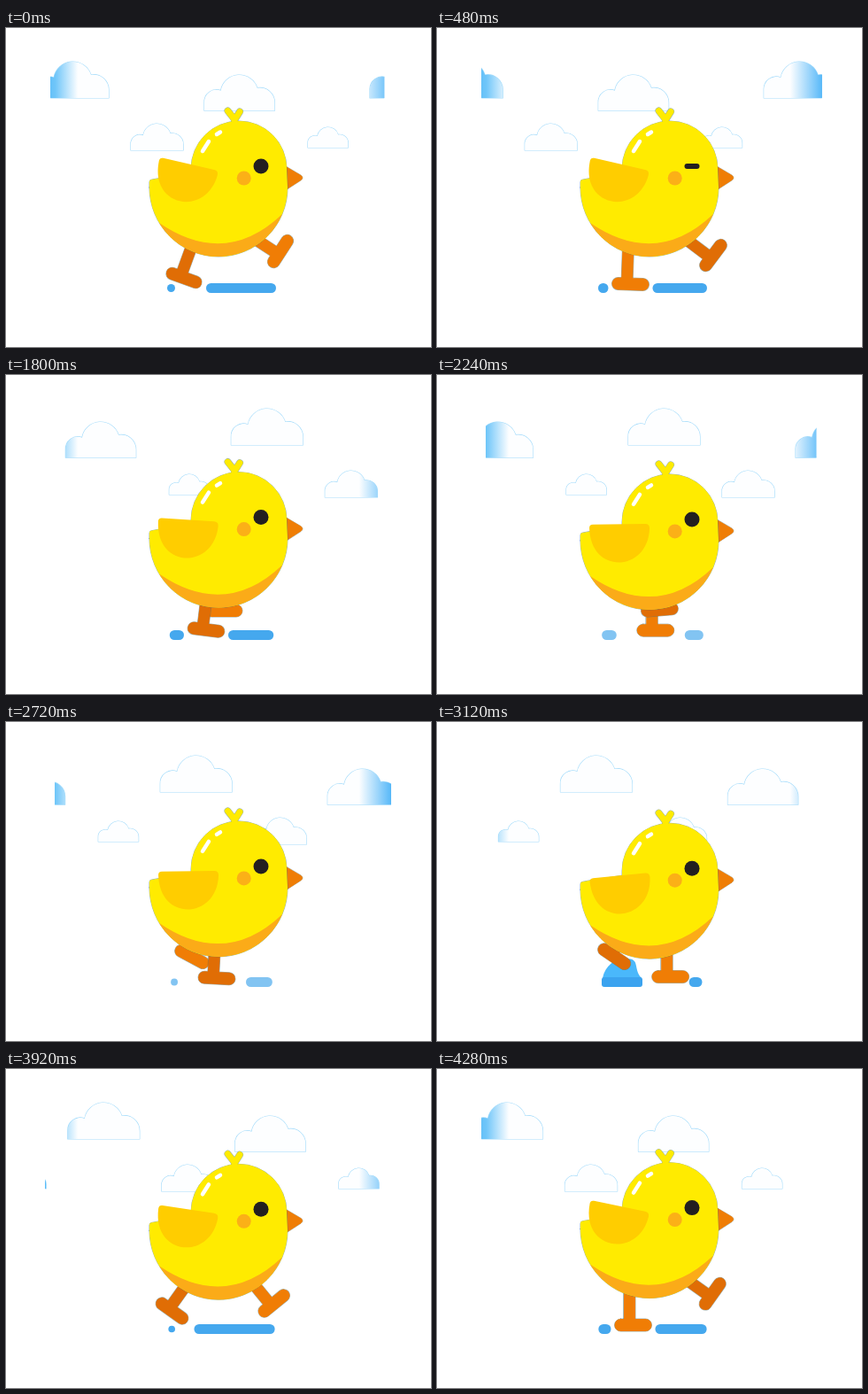
An HTML page with a canvas that plays this animation: 480x360 px, repeating every 4.32 s.

```html
<!DOCTYPE html>
<html>
<head>
<meta charset="utf-8">
<style>
html, body { margin: 0; width: 100%; height: 100%; overflow: hidden; background: #fff; }
canvas { display: block; }
</style>
</head>
<body>
<canvas id="stage" width="480" height="360"></canvas>
<script>
const c = document.getElementById('stage').getContext('2d');
const LOOP = 4320, STEP = 40, STRIDE = 960, CLOUD_SPAN = 376;
const EDGE = 'rgba(70,115,120,.55)';

// Clouds: left, top, scale, left cut-off
const clouds = [[35, 38, 1, 50], [224, 53, .98, 55], [141, 108, .73, 48], [341, 112, .56, 44]];
const cloudShape = new Path2D('M0 41V32A14 14 0 0 1 19 18A21.7 21.7 0 0 1 61 15A17 17 0 0 1 81 32V41Z');
const sky = c.createLinearGradient(44, 0, 436, 0);
[[0, '#5bbcf8'], [.03, '#70c6f9'], [.095, '#fdfeff'], [.905, '#fdfeff'], [1, '#52b6f8']]
  .forEach(stop => sky.addColorStop(...stop));

// Foot poses: phase, x, y, angle
const lightKeys = [
  [0, 310, 252, -57], [50, 311, 256, -54], [160, 280.5, 287, 0], [440, 221.5, 289, 0],
  [480, 218.5, 289, 2], [540, 201, 282, 20], [680, 177, 262, 52], [800, 210, 265, 28],
  [840, 246, 266, 0], [960, 310, 252, -57]];
const darkKeys = [
  [0, 311, 253, -55], [50, 312, 256.5, -53], [160, 281, 287, 0], [250, 256, 286, -1],
  [370, 238, 289, 3], [410, 226, 287.5, 7], [530, 201, 282, 20], [690, 174, 264, 51],
  [800, 210, 265, 28], [840, 246, 266, 0], [960, 311, 253, -55]];

const body = new Path2D('M162 180V174Q162 171 165 171L173 169.5L209 164V159A54 54 0 0 1 317 159L318 180A78 78 0 0 1 162 180Z');
const belly = new Path2D('M173 220Q248 271 312 210A78 78 0 0 1 173 220Z');
const beak = new Path2D('M314 156L316 156L333 166Q337 169 333 172L316 183L314 183Z');
const tuft = new Path2D('M250.5 93.5L258 103V108M264 94.5L258 104');
const shine = new Path2D('M222 139L229 128M238 120L242 117.5');
const wing = new Path2D('M-63 0H-4Q1 0 1 5C-1 54 -66 58 -67 4Q-67 0 -63 0Z');

function shape(path, fill, edge, width = .8) {
  if (edge) {
    c.strokeStyle = edge;
    c.lineWidth = width * 2;
    c.stroke(path);
  }
  c.fillStyle = fill;
  c.fill(path);
}

function line(path, color, width) {
  c.strokeStyle = color;
  c.lineWidth = width;
  c.stroke(path);
}

function pill(x, y, w, h, color) {
  if (w <= 0) return;
  c.fillStyle = color;
  c.beginPath();
  c.roundRect(x, y, w, h, Math.min(w, h) / 2);
  c.fill();
}

function dot(x, y, r, color) {
  pill(x - r, y - r, 2 * r, 2 * r, color);
}

function pose(keys, phase) {
  const i = keys.findIndex(k => k[0] > phase);
  const a = keys[i - 1], b = keys[i], f = (phase - a[0]) / (b[0] - a[0]);
  const [, x, y, angle] = a.map((v, j) => v + (b[j] - v) * f);
  return { x, y, angle };
}

function drawClouds(t) {
  for (const [x0, y, s, cut] of clouds) {
    const start = x0 - t * CLOUD_SPAN / LOOP;
    for (const x of [start, start + CLOUD_SPAN]) {
      const right = 435 - .18 * Math.max(0, x - 369);
      const p = new Path2D();
      p.addPath(cloudShape, new DOMMatrix([s, 0, 0, s, x, y]));
      c.save();
      c.beginPath();
      c.roundRect(cut, y - 2, Math.max(0, right - cut), 46, 4);
      c.clip();
      shape(p, sky, '#a5dcfb', .6);
      c.restore();
    }
  }
}

function drawShadow(u, bob, foot) {
  const left = 182 + .6 * bob, right = 305 - .6 * bob;
  const pale = u > 270 && u < 345, open = u > 110 && u < 270;
  const color = pale ? '#82c4f2' : '#45a8ee';
  if (open) {
    const end = 309 - .325 * u;
    shape(new Path2D(`M187 289C190 275 200 267 214 267C230 267 ${end - 10} 278 ${end} 289Z`), '#4ab8fb');
    c.fillStyle = '#3ba3ef';
    c.beginPath();
    c.roundRect(186, 288, end - 185, 11, 3);
    c.fill();
  } else {
    const gap = Math.max(191, foot.x - 25 - (pale ? 19 : 0));
    const h = Math.min(11, gap - left);
    pill(left, 293.5 - h / 2, gap - left, h, color);
  }
  const from = foot.x + (open ? 21 : 25) + (pale ? 8 : 0);
  pill(from, 288, right - from, 11, color);
}

function drawLeg({ x, y, angle }, color) {
  const p = new Path2D();
  p.roundRect(-21, -7, 42, 14, 7);
  p.rect(-10.5, -40, 13, 40);
  c.save();
  c.translate(x, y);
  c.rotate(angle * Math.PI / 180);
  shape(p, color, EDGE, .5);
  c.restore();
}

function drawChick(t, bob) {
  c.save();
  c.translate(0, bob);
  shape(beak, '#ef7d05', EDGE, .4);
  line(tuft, EDGE, 8);
  shape(body, '#ffeb00', EDGE, .5);
  line(tuft, '#ffeb00', 7);
  shape(belly, '#fbab18');
  line(shine, '#fff', 4.5);

  const lid = Math.max(0, 1 - Math.max(0, Math.abs(t - 480) - 20) / 80);
  const h = 17 - 11 * lid;
  pill(279.5, 156 - h / 2, 17, h, '#231f20');
  dot(268.7, 169.5, 8, '#fbb017');

  c.translate(239, 161);
  c.rotate((13 - 2 * bob) * Math.PI / 180);
  shape(wing, '#ffcd00');
  c.restore();
}

function draw(now) {
  const t = Math.floor(now / STEP) * STEP % LOOP;
  const u = t % (STRIDE / 2);
  const bob = 4.6 * (1 - Math.cos(u / STRIDE * 4 * Math.PI));
  const light = pose(lightKeys, t % STRIDE);
  const dark = pose(darkKeys, (t + 530) % STRIDE);

  c.clearRect(0, 0, 480, 360);
  c.lineCap = c.lineJoin = 'round';
  drawClouds(t);
  drawShadow(u, bob, light.y > dark.y ? light : dark);
  drawLeg(light, '#f07d05');
  drawLeg(dark, '#e06d05');
  drawChick(t, bob);
}

const began = performance.now();
function tick() {
  draw(performance.now() - began);
  requestAnimationFrame(tick);
}
tick();
</script>
</body>
</html>
```
